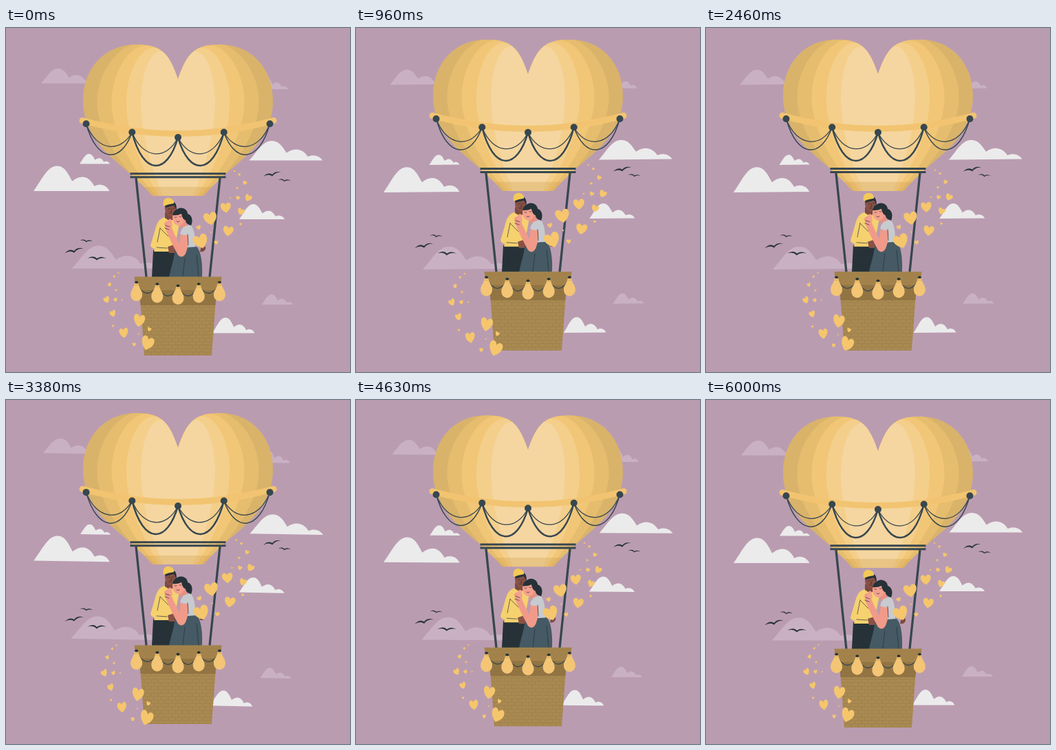
Recreate the animation shown at these times as an HTML page. Size 500 by 500 pixels, loop 6.04 s.

```html
<!DOCTYPE html>
<html lang="en">
<head>
<meta charset="utf-8">
<title>Heart balloon</title>
<style>
html, body { margin: 0; width: 100%; height: 100%; overflow: hidden; background: #ba9cb1; }
svg { display: block; width: 100%; height: 100%; }
.rope { fill: none; stroke: #37474f; }
.line { fill: none; stroke: #263238; stroke-width: .7; stroke-linecap: round; }
</style>
</head>
<body>
<svg viewBox="0 0 500 500">
  <defs>
    <path id="cloud" d="M0 36C12 20 20 0 34 0C45 0 50 11 56 22C68 12 80 14 88 29C97 24 106 28 110 36Z"/>
    <path id="bird" d="M-13 4Q-6 -3 0 1Q5 -5 13 -2Q5 -3 0 3.500Q-5 -.5 -13 4Z"/>
    <path id="heart" d="M0 1C-.6 .6 -1 .15 -1 -.4C-1 -1 -.25 -1.15 0 -.5C.25 -1.15 1 -1 1 -.4C1 .15 .6 .6 0 1Z"/>
    <g id="tassel">
      <path d="M-3 3H3C3 9 8.500 12 8.500 19C8.500 25 4 28.500 0 28.500S-8.500 25 -8.500 19C-8.500 12 -3 9 -3 3Z" fill="#f3c575"/>
      <path d="M-3 5H3" stroke="#d9ab5c"/>
      <ellipse cy="1" rx="2.500" ry="1.800" fill="#263238"/>
    </g>
    <clipPath id="envelope">
      <path d="M250 75C243 54 235 36 219 29C210 25 200 24 189 24C144 24 112 58 112 106C112 141 130 167 153 188C171 204 192 220 213 244H287C308 220 329 204 347 188C370 167 388 141 388 106C388 58 356 24 311 24C300 24 290 25 281 29C265 36 257 54 250 75Z"/>
    </clipPath>
    <pattern id="weave" width="10" height="10" patternUnits="userSpaceOnUse">
      <path d="M0 1H10M0 6H10M1 1V6M6 6V11M6 0V1" fill="none" stroke="#94753f" stroke-width=".8" opacity=".65"/>
    </pattern>
  </defs>

  <g id="clouds"></g>

  <g id="float">
    <g id="birds" fill="#263238"></g>

    <g clip-path="url(#envelope)">
      <g id="panels"></g>
      <path d="M190 231H310V246H190Z" fill="#c99a45" opacity=".3"/>
    </g>
    <path d="M111 134.500Q180 153.500 250 153.500T389 134.500" fill="none" stroke="#f2c471" stroke-width="9" stroke-linecap="round"/>
    <g id="swags"></g>
    <path class="rope" d="M180.500 211.800H319.500M180.500 216.800H319.500" stroke-width="3"/>
    <path class="rope" d="M189 218L204 362M311 218L296 362" stroke-width="3.300"/>

    <!-- man -->
    <path d="M214 323L212 362H241L246 322Z" fill="#263238"/>
    <path d="M284 317q7 -1 6 4q-2 5 -8 4z" fill="#7d4a3f"/>
    <path d="M231 275C222 277 219 284 216 296L210 316Q211 320 216 321L215 325H244L252 284L243 274Z" fill="#f5d16f"/>
    <path d="M235 318l9 -3 7 5 -3 7 -11 0z" fill="#8a5145"/>
    <path d="M231 268L231 276Q239 283 246 276L246 264Z" fill="#7d4a3f"/>
    <path d="M231 257Q230 272 239 274Q248 273 247 257Z" fill="#8a5145"/>
    <path d="M236 255Q248 247 248 265L244 258L232 261L231 256Z" fill="#263238"/>
    <path d="M229 259C227 249 233 246 237 247C242 248 245 251 244 255Q236 256 229 259Z" fill="#f3c957"/>
    <path class="line" d="M236 263l2 -.5M242 262l2 .5M240 263l1 4h-2M237 269q2 1 4 0M224 291L220 311M224 291L236 303M219 319L234 320"/>

    <!-- woman -->
    <path d="M250 263C256 259 264 264 264 270C271 272 272 281 269 287C264 286 261 283 259 277L248 278Z" fill="#263238"/>
    <path d="M252 277L260 277L264 290L254 291Z" fill="#e98f7f"/>
    <path d="M242 275C242 267 254 264 258 271C261 279 258 286 252 287C246 287 242 283 242 275Z" fill="#f4a08f"/>
    <path d="M242 272C245 260 259 259 263 269L262 279C258 280 256 275 255 270Q249 273 242 272Z" fill="#263238"/>
    <path d="M257 290Q268 283 271 290C275 298 275 309 275 321L254 322Q252 305 257 290Z" fill="#c7cbd0"/>
    <path d="M246 320L277 318C284 324 286 345 285 362H237C240 347 244 338 246 320Z" fill="#455a64"/>
    <path d="M264 296C267 306 265 318 261 328Q256 336 250 330C243 317 237 305 232 293L230 284Q234 279 237 282L242 293C247 305 250 309 252 314L254 298Z" fill="#f19a89"/>
    <path d="M234 282q3 -6 6 -4l2 9q-2 7 -7 5z" fill="#f4a08f"/>
    <path d="M255 293Q262 287 267 294L266 301Q259 302 253 299Z" fill="#c7cbd0"/>
    <path class="line" d="M245 275q1.500 1 3 0M252 274q2 1 3 0M248 281q2 2 4 0M264 300L265 316M260 335L257 361M277 330L280 361M232 287l6 2M231 291l6 2"/>

    <!-- basket -->
    <path d="M194 379H306L299 476H201Z" fill="#a98a52"/>
    <path d="M194 379H306L299 476H201Z" fill="url(#weave)"/>
    <path d="M194 379H306L304.500 403H195.500Z" fill="#8b6e3e" opacity=".72"/>
    <path d="M186.500 361.500H313.500L311.500 381H188.500Z" fill="#a3834b"/>
    <path d="M186.500 361.500H313.500L311.500 381H188.500Z" fill="url(#weave)" opacity=".4"/>
    <path class="rope" d="M190 372Q205 398 220 374Q235 404 250 376Q265 404 280 374Q295 398 310 372" stroke-width="1.300"/>
    <g id="tassels"></g>
  </g>

  <g id="hearts" fill="#f5c66c">
    <g id="cluster"></g>
    <use href="#cluster" transform="matrix(-.86 0 0 1 449 148)"/>
    <use href="#heart" transform="translate(319.500 261) rotate(-5) scale(7.500)"/>
  </g>
</svg>
<script>
const $ = id => document.getElementById(id);
const fill = (id, items, draw) => $(id).innerHTML = items.map(draw).join('');
const place = (shape, x, y, turn, sx, sy = sx) =>
  `<use href="#${shape}" transform="translate(${x} ${y}) rotate(${turn}) scale(${sx} ${sy})"/>`;
const LOOP = 6040, CYCLE = 1500;
const OFFSETS = [-2, -1, 0, 1, 2];

// left, top, width, height
const farClouds = [[51, 59, 80, 21.5], [364, 71, 46, 18], [96, 316.5, 125, 33], [372, 387, 45, 15]];
const nearClouds = [[40, 200.5, 110.5, 36.5], [107, 183, 44, 14.5], [353.5, 164, 106.5, 28.5],
  [339, 256, 66, 22], [300, 421, 61.5, 22.5]];
const cloud = ([x, y, w, h]) => place('cloud', x, y, 0, w / 110, h / 36);
$('clouds').innerHTML =
  `<g fill="#c9b1c3">${farClouds.map(cloud).join('')}</g>
   <g fill="#ebebeb">${nearClouds.map(cloud).join('')}</g>`;

// x, y, tilt, size
fill('birds', [[387, 212, 0, 1], [405, 221, 18, .7], [99, 323, 0, 1.05], [117, 309, 18, .7], [132.5, 334, 14, 1.05]],
  b => place('bird', ...b));

// nested panels, from the dark rim to the light centre
fill('panels', ['#d9b36a', '#e6bd6e', '#f2c677', '#f4cf8b', '#f5d6a0'], (color, i) => {
  const edge = i ? 111 + 21.3 * i : 90;
  const topX = 184 + 10 * i, topY = 22 + .75 * i * i;
  const endX = i ? 209 + 5 * i : 180;
  const half = side => {
    const at = x => side < 0 ? x : 500 - x;
    return { top: at(topX), bend: at((edge + topX) / 2), edge: at(edge),
      waist: at(edge * .6 + endX * .4), end: at(endX) };
  };
  const l = half(-1), r = half(1);
  return `<path fill="${color}" d="M${l.top} ${topY}C${l.bend} ${topY} ${l.edge} 65 ${l.edge} 108
    C${l.edge} 150 ${l.waist} 200 ${l.end} 246H${r.end}C${r.waist} 200 ${r.edge} 150 ${r.edge} 108
    C${r.edge} 65 ${r.bend} ${topY} ${r.top} ${topY}Z"/>`;
});

const knob = i => [250 + 66.75 * i, 159 - 7.5 * Math.abs(i) ** 1.4];
const swag = (i, depth, width) => {
  const a = knob(i), b = knob(i + 1);
  return `<path class="rope" stroke-width="${width}" d="M${a}C${a[0] + 16} ${depth} ${b[0] - 16} ${depth} ${b}"/>`;
};
fill('swags', OFFSETS, i => {
  const [x, y] = knob(i), outer = i == -2 || i == 1;
  const ropes = i < 2 ? swag(i, outer ? 197 : 215, outer ? 1.5 : 2.5) + swag(i, outer ? 181 : 192, 1.3) : '';
  return `${ropes}<circle cx="${x}" cy="${y}" r="5" fill="#37474f"/>`;
});

fill('tassels', OFFSETS, i => place('tassel', 250 + 30.2 * i, 373.5 - 2.5 * Math.abs(i), 0, 1));

// x, y, half width; the tilt fans out from the middle of the cluster
fill('cluster', [
  [283, 310, 10.5], [297, 277, 9.5], [323, 295, 7.5], [341.5, 267, 5], [352, 247, 5],
  [337, 247, 3], [347, 225, 3], [280, 290, 3.2], [305.5, 312, 3],
  [336, 233, 1.7], [332, 208, 1.3], [339, 213, 1.8], [341, 285, 1.8], [326, 247, 1.2], [298, 297, 1.2]
], ([x, y, s]) => place('heart', x, y, (x - 312) * .7, s));

// triangle wave 0..1..0, and a tent-shaped pulse
const wave = u => 1 - Math.abs(2 * (u % 1) - 1);
const pulse = (t, peak, rise, fall) => Math.max(0, 1 - (t < peak ? (peak - t) / rise : (t - peak) / fall));

function frame(now) {
  const t = now % LOOP, u = t / CYCLE;
  const beat = 1 + .1 * (pulse(t, 600, 600, 1050) + pulse(t, 3040, 650, 510));
  $('float').setAttribute('transform', `translate(0 ${-10 * wave(u)})`);
  $('clouds').setAttribute('transform', `rotate(${2 * wave(u + .25) - 1} 250 250)`);
  $('hearts').setAttribute('transform', `translate(250 338) scale(${beat}) translate(-250 -338)`);
  requestAnimationFrame(frame);
}
frame(0);
</script>
</body>
</html>
```
